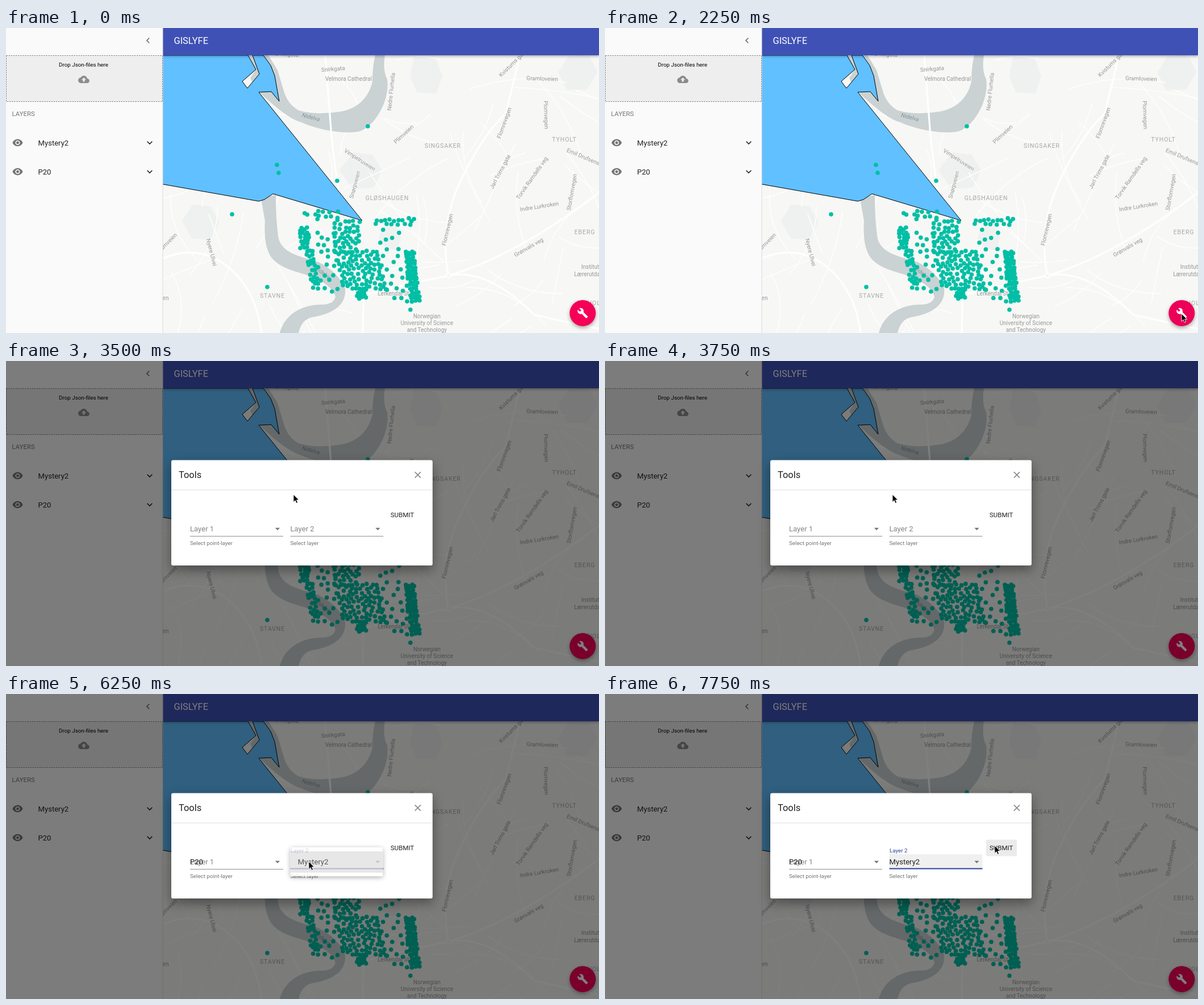
Write an HTML page that moves like this. It is 1044x537 px and loops after 8 s.

```html
<!DOCTYPE html>
<html lang="en">
<head>
<meta charset="utf-8">
<title>Map tools</title>
<style>
html, body { margin: 0; width: 100%; height: 100%; overflow: hidden; background: #fafafa; }
svg { display: block; width: 100vw; height: 100vh; font-family: Roboto, sans-serif; font-size: 13.1px; fill: rgba(0,0,0,.87); }
.small { font-size: 9.8px; fill: #757575; }
.title { font-size: 16.4px; }
.label { font-size: 10px; fill: #969a9a; text-anchor: middle; stroke: #f7f7f5; stroke-width: 2px; paint-order: stroke; }
.district { font-size: 10.5px; letter-spacing: .9px; fill: #a6a9a9; }
.river { font-style: italic; fill: #84939a; stroke: none; }
.water { fill: #cad2d3; }
.road { fill: none; stroke: #fff; stroke-linecap: round; }
.dialog { fill: #fff; filter: drop-shadow(0 8px 10px rgba(0,0,0,.38)); }
.menu { fill: #fff; filter: drop-shadow(0 2px 4px rgba(0,0,0,.42)); }
.raised { filter: drop-shadow(0 3px 3px rgba(0,0,0,.32)); }
</style>
</head>
<body>
<svg viewBox="0 0 1044 537">
  <g id="map"></g>
  <g id="chrome"></g>
  <g id="overlay"></g>
</svg>
<script>
const STEP = 250, LOOP = 8000;
const INDIGO = '#303f9f';
const $ = id => document.getElementById(id);

const ICONS = {
  wrench: 'M22.7 19l-9.1-9.1c.9-2.3.4-5-1.5-6.9-2-2-5-2.4-7.4-1.3L9 6 6 9 1.6 4.7C.4 7.1.9 10.1 2.9 12.1c1.9 1.9 4.6 2.4 6.9 1.5l9.1 9.1c.4.4 1 .4 1.4 0l2.3-2.3c.5-.4.5-1.1.1-1.4z',
  eye: 'M12 4.5C7 4.5 2.73 7.61 1 12c1.73 4.39 6 7.5 11 7.5s9.27-3.11 11-7.5c-1.73-4.39-6-7.5-11-7.5zM12 17c-2.76 0-5-2.24-5-5s2.24-5 5-5 5 2.24 5 5-2.24 5-5 5zm0-8c-1.66 0-3 1.34-3 3s1.34 3 3 3 3-1.34 3-3-1.34-3-3-3z',
  upload: 'M19.35 10.04C18.67 6.59 15.64 4 12 4 9.11 4 6.6 5.64 5.35 8.04 2.34 8.36 0 10.91 0 14c0 3.31 2.69 6 6 6h13c2.76 0 5-2.24 5-5 0-2.64-2.05-4.78-4.65-4.96zM14 13v4h-4v-4H7l5-5 5 5h-3z',
  expand: 'M16.59 8.59L12 13.17 7.41 8.59 6 10l6 6 6-6z',
  back: 'M15.41 7.41L14 6l-6 6 6 6 1.41-1.41L10.83 12z',
  close: 'M19 6.41L17.59 5 12 10.59 6.41 5 5 6.41 10.59 12 5 17.59 6.41 19 12 13.41 17.59 19 19 17.59 13.41 12z',
  inbox: 'M19 3H4.99c-1.11 0-1.98.9-1.98 2L3 19c0 1.1.88 2 1.99 2H19c1.1 0 2-.9 2-2V5c0-1.1-.9-2-2-2zm0 12h-4c0 1.66-1.35 3-3 3s-3-1.34-3-3H4.99V5H19v10z',
  drop: 'M7 10l5 5 5-5z'
};

const icon = (name, x, y, fill = '#757575') =>
  `<path d="${ICONS[name]}" fill="${fill}" transform="translate(${x} ${y}) scale(.82) translate(-12 -12)"/>`;
const text = (str, x, y, attrs = '') => `<text x="${x}" y="${y}" ${attrs}>${str}</text>`;
const rect = (x, y, w, h, attrs) => `<rect x="${x}" y="${y}" width="${w}" height="${h}" ${attrs}/>`;
const path = (d, attrs) => `<path d="${d}" ${attrs}/>`;
const circle = (x, y, r, attrs) => `<circle cx="${x}" cy="${y}" r="${r}" ${attrs}/>`;
const label = (str, x, y, turn = 0, kind = '') =>
  `<text class="label ${kind}" transform="translate(${x} ${y}) rotate(${turn})" y="3.5">${str}</text>`;
const repeat = (count, make) => Array.from({ length: count }, (_, i) => make(i)).join('');

let seed = 11;
const random = () => (seed = seed * 16807 % 2147483647) / 2147483647;
const between = (a, b) => a + (b - a) * random();

// Random dots, at least `gap` apart, along a band of the given horizontal width
function band(x1, y1, x2, y2, width, count, gap) {
  const found = [];
  for (let tries = 0; found.length < count && tries < 3000; tries++) {
    const u = random();
    const x = x1 + (x2 - x1) * u + between(-width, width) / 2, y = y1 + (y2 - y1) * u;
    if (found.every(p => Math.hypot(p[0] - x, p[1] - y) > gap)) found.push([x, y]);
  }
  return found;
}

const dots = () => [
  [637, 173], [477, 241], [480, 255], [583, 269], [398, 328], [460, 456], [712, 496],
  ...band(555, 322, 555, 338, 62, 12, 5),
  ...band(683, 334, 683, 347, 72, 16, 6),
  ...band(525, 350, 526, 390, 16, 21, 4.5),
  ...band(534, 390, 545, 460, 12, 26, 4.5),
  ...band(562, 357, 568, 466, 34, 22, 10),
  ...band(602, 338, 598, 395, 46, 44, 6),
  ...band(615, 392, 632, 460, 74, 88, 6),
  ...band(626, 458, 626, 478, 18, 12, 4.5),
  ...band(673, 355, 690, 487, 42, 24, 11),
  ...band(711, 393, 715, 440, 15, 45, 4),
  ...band(715, 440, 722, 482, 16, 28, 4.5)
].map(([x, y]) => circle(x.toFixed(1), y.toFixed(1), 3.8, 'fill="#00bfa5"')).join('');

function sideRoad() {
  const x = between(277, 1044), y = between(48, 537);
  const angle = between(0, Math.PI), length = between(50, 170), bend = between(-.5, .5);
  const point = (r, a) => `${(x + r * Math.cos(a)).toFixed(1)} ${(y + r * Math.sin(a)).toFixed(1)}`;
  return path(`M${x.toFixed(1)} ${y.toFixed(1)}Q${point(length / 2, angle + bend)} ${point(length, angle)}`,
    'class="road" stroke-width="1.4"');
}

function park(x, y, size) {
  const corners = Array.from({ length: 6 }, (_, i) => {
    const a = i * Math.PI / 3, r = size * between(.7, 1.1);
    return `${(x + r * Math.cos(a)).toFixed(1)} ${(y + r * Math.sin(a)).toFixed(1)}`;
  });
  return path(`M${corners.join('L')}Z`, 'fill="#eff1f0"');
}

const upperRiver = 'M426 48H436L447 80 434 96 430 88 440 73ZM445 112L467 111 481 128 473 84 453 48H462L478 74 490 114Q497 135 515 145C545 153 565 150 590 147C618 142 638 124 645 95Q645 70 650 48H667Q663 75 671 90C677 125 650 174 622 182C595 188 545 178 520 166Q495 160 445 112Z';
const lowerRiver = 'M449 300L456 340Q453 385 468 405C488 428 520 429 545 441Q575 455 580 473Q577 487 555 487C520 487 490 505 482 537H515Q520 513 540 509C580 502 600 485 597 458Q585 430 550 412C515 402 482 395 479 365Q475 335 475 294Z';
const mainRoads = [
  'M562 48L573 190Q578 240 588 300L612 350 630 450 628 537',
  'M779 436Q762 350 800 270T880 150L905 48', 'M779 436Q900 400 1044 290',
  'M630 470Q710 450 779 436T930 505L1044 530', 'M277 405Q340 380 390 420T450 537'
];
const blueArea = 'M270 48H426L440 73 416 94 425 106 446 81 434 48H453L459 56 466 66 473 84 481 129 467 112 445 113 627 339 470 292 455 302 445 305 270 274Z';

const places = [
  ['Murkelgata', 490, 46, 3], ['Snirkgata', 576, 72, -5], ['Velmora Cathedral', 603, 89],
  ['Nedre Flurhella', 678, 112, -84], ['Plimveien', 700, 187, -43], ['Gramloveien', 944, 89, 2],
  ['Kvistums ga', 889, 65, -45], ['Plomvegen', 951, 153, 88], ['Flomrevegen', 877, 167, -70],
  ['Emil Drufsens ve', 1022, 229, 23], ['Jarl Trims gate', 870, 253, -62], ['Torvik Ramdells veg', 926, 264, -55],
  ['Storflomvegen', 996, 289, -80], ['Indre Lurkroken', 939, 314, -9], ['Grønvals veg', 920, 386, -30],
  ['Flomrevegen', 777, 355, -77], ['Nyere Ulvei', 362, 395, 76], ['umveien', 286, 376, -45],
  ['Vimpelruveien', 623, 232, 33], ['Snørpveien', 614, 276, -75], ['en', 281, 475],
  ['Institutt', 1030, 420], ['Lærerutda', 1023, 433], ['Norwegian', 741, 507],
  ['University of Science', 741, 519], ['and Technology', 741, 531], ['Lerkendal St', 682, 467],
  ['SINGSAKER', 769, 207, 0, 'district'], ['TYHOLT', 983, 196, 0, 'district'],
  ['GLØSHAUGEN', 671, 299, 0, 'district'], ['EBERG', 1019, 359, 0, 'district'],
  ['STAVNE', 469, 471, 0, 'district'], ['MOHOLT', 1029, 484, 0, 'district'],
  ['Nidelva', 537, 157, 15, 'river'], ['Nidelva', 558, 431, 38, 'river']
];

$('map').innerHTML =
  rect(276, 48, 768, 489, 'fill="#f7f7f5"') +
  park(740, 85, 40) + park(1005, 78, 40) + park(630, 250, 42) + park(345, 340, 38) + park(675, 370, 25) +
  repeat(75, sideRoad) +
  path(upperRiver, 'class="water"') + path(lowerRiver, 'class="water"') +
  mainRoads.map(d => path(d, 'class="road" stroke-width="3.2"')).join('') +
  circle(779, 436, 4, 'fill="#f7f7f5" stroke="#fff" stroke-width="2"') +
  places.map(place => label(...place)).join('') +
  path(blueArea, 'fill="#61c0ff" stroke="#000"') +
  dots();

const layerRow = (name, y, hover) =>
  rect(0, y - 19, 276, 38, `fill="#000" opacity="${hover}"`) + icon('eye', 20.5, y) +
  text(name, 56.5, y + 4.5) + icon('expand', 253, y, '#212121');

function chrome(k) {
  const fab = k === 10 ? '#ff2d75' : k > 5 && k < 10 ? '#ec0058' : '#f50057';
  return rect(276, 0, 768, 48, 'fill="#3f51b5" style="filter:drop-shadow(0 2px 2px rgba(0,0,0,.3))"') +
    text('GISLYFE', 295.5, 28, 'class="title" style="fill:#fff"') +
    rect(0, 0, 276, 537, 'fill="#fafafa"') + rect(275.5, 0, 1, 537, 'fill="#dcdcdc"') +
    icon('back', 250, 22) +
    rect(.5, 48.5, 275, 81, 'fill="#eee" stroke="#808080" stroke-dasharray="2.5 1.6"') +
    text('Drop Json-files here', 136.5, 68, 'font-size="9.8" text-anchor="middle" style="fill:#000"') +
    icon('upload', 137, 90.5, '#8b8b8b') +
    text('LAYERS', 10.5, 155, 'font-size="11.4" style="fill:#757575"') +
    layerRow('Mystery2', 202, k === 5 ? .03 : 0) + layerRow('P20', 253, 0) +
    circle(1015.3, 502, 23, `class="raised" fill="${fab}"`) + icon('wrench', 1015.3, 502, '#fff') +
    rect(0, 0, 1044, 537, `fill="#000" opacity="${k < 10 ? 0 : .5}"`);
}

const frame = (x, y, w, h) =>
  rect(x, y, w, h, 'rx="3" class="dialog"') + text('Tools', x + 13, y + 31.8, 'class="title"') +
  icon('close', x + w - 26, y + 26, '#8a8a8a') + rect(x, y + 52, w, 1, 'fill="#dedede"');

const toolList = k => frame(431, 146, 180, 243) +
  rect(431, 218, 180, 38, `fill="#000" opacity="${k < 13 ? 0 : .08}"`) +
  ['Within', 'Buffer', 'Intersection', 'Difference'].map((name, i) =>
    icon('inbox', 467, 237.3 + i * 37.7) + text(name, 503, 241.7 + i * 37.7)).join('');

function select(x, name, hint, focused, value) {
  return (focused && value ? rect(x, 282, 164, 26, 'fill="#f0f0f0"') : '') +
    (focused ? text(name, x + .5, 278.5, `font-size="9.8" style="fill:${INDIGO}"`)
             : text(name, x, 300, 'style="fill:#858585"')) +
    text(value, x, 300) + icon('drop', x + 154, 295.5) +
    (focused ? rect(x, 306.5, 164, 2, `fill="${INDIGO}"`) : rect(x, 308, 164, 1, 'fill="#8e8e8e"')) +
    text(hint, x, 323.5, 'class="small"');
}

// A menu fades in at step `open` and out at step `close`
function menu(x, value, k, open, close) {
  if (k < open || k > close) return '';
  const alpha = k === open ? .75 : k === close ? .35 : 1;
  return `<g opacity="${alpha}">` + rect(x, 270, 163, 51, 'rx="2" class="menu"') +
    rect(x, 277, 163, 37.5, 'fill="#e0e0e0"') + text(value, x + 13.3, 300) + '</g>';
}

function withinForm(k) {
  const hover = Math.min(Math.max(k - 27, 0), 2) * .04;
  return frame(291, 174.5, 460, 185.5) +
    rect(671, 256.5, 54, 29, `rx="2" fill="#000" opacity="${hover}"`) +
    text('SUBMIT', 677, 275.3, 'font-size="11.5"') +
    select(324, 'Layer 1', 'Select point-layer', k >= 17 && k < 25, k >= 21 ? 'P20' : '') +
    select(500.5, 'Layer 2', 'Select layer', k >= 25, k >= 27 ? 'Mystery2' : '') +
    menu(324, 'P20', k, 17, 21) + menu(500.5, 'Mystery2', k, 25, 27);
}

// Pointer rests: first step, last step, x, y
const rests = [
  [5, 5, 850, 430], [6, 10, 1015, 503], [13, 15, 506, 235],
  [17, 21, 383, 303], [24, 27, 533, 295], [29, 32, 686, 267]
];
function pointer(k) {
  const i = rests.findIndex(rest => k <= rest[1]);
  const [arrive, , toX, toY] = rests[i];
  const [, leave, fromX, fromY] = rests[Math.max(i - 1, 0)];
  if (k < rests[0][0]) return '';
  const u = k >= arrive ? 1 : (k - leave) / (arrive - leave);
  return path('M0 0V13.5L3.2 10.6 5.2 15.4 7.6 14.3 5.6 9.7H9.8Z',
    `transform="translate(${fromX + (toX - fromX) * u} ${fromY + (toY - fromY) * u})" fill="#000" stroke="#fff" stroke-width=".9"`);
}

let shown = -1;
const start = performance.now();
function draw() {
  const k = Math.floor((performance.now() - start) % LOOP / STEP);
  if (k !== shown) {
    shown = k;
    $('chrome').innerHTML = chrome(k);
    $('overlay').innerHTML = (k < 10 ? '' : k < 14 ? toolList(k) : withinForm(k)) + pointer(k);
  }
  requestAnimationFrame(draw);
}
draw();
</script>
</body>
</html>
```
